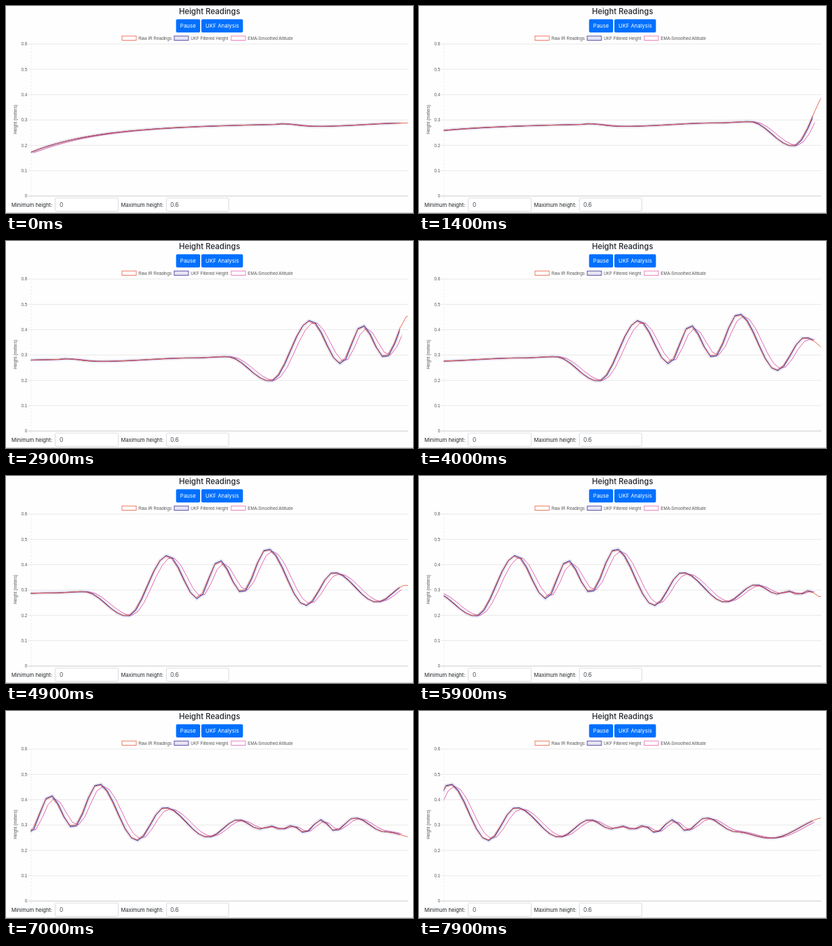
These frames come from a looping animation (600 by 305 pixels, 8000 ms). An HTML page:

```html
<!DOCTYPE html>
<html lang="en">
<head>
<meta charset="utf-8">
<title>Height Readings</title>
<style>
  html, body { margin: 0; width: 100%; height: 100%; overflow: hidden; background: #fefefe; }
  svg { display: block; width: 600px; height: 305px; }
  text { font: 7.7px Inter, "Open Sans", sans-serif; fill: #212529; }
  .chart text { font: 6.3px "Liberation Sans", Arial, sans-serif; fill: #585858; }
  .title { font-size: 11.5px; font-weight: 500; }
  .button { fill: #0070ff; }
  .caption { font-size: 7.9px; fill: #fff; }
  .field { fill: #fff; stroke: #d9dce0; }
  .value { font-size: 8.4px; fill: #495057; }
  polyline { fill: none; stroke-linejoin: round; }
</style>
</head>
<body>
<svg viewBox="0 0 600 305">
  <defs>
    <clipPath id="rawArea"><rect x="36.5" y="50" width="556" height="235"/></clipPath>
    <clipPath id="ukfArea"><rect x="36.5" y="50" width="544" height="235"/></clipPath>
    <clipPath id="emaArea"><rect x="36.5" y="50" width="547" height="235"/></clipPath>
  </defs>
  <text class="title" x="300" y="12.3" text-anchor="middle">Height Readings</text>
  <rect class="button" x="250.7" y="19.5" width="35.5" height="19.5" rx="2"/>
  <rect class="button" x="288" y="19.5" width="61.3" height="19.5" rx="2"/>
  <text class="caption" x="268.3" y="32" text-anchor="middle">Pause</text>
  <text class="caption" x="318.7" y="32" text-anchor="middle">UKF Analysis</text>

  <g class="chart">
    <g id="legend"></g>
    <g id="grid"></g>
    <path d="M37 56V285" stroke="#f4ecec" stroke-dasharray="3 2"/>
    <text transform="translate(15.7 167) rotate(-90)" text-anchor="middle">Height (meters)</text>
    <g clip-path="url(#emaArea)"><polyline id="ema" stroke="#e0559f" stroke-width=".9"/></g>
    <g clip-path="url(#ukfArea)">
      <polyline id="band" stroke="#3a2f96" stroke-opacity=".1" stroke-width="5.5"/>
      <polyline id="ukf" stroke="#453c9c" stroke-width="1.1"/>
    </g>
    <g clip-path="url(#rawArea)"><polyline id="raw" stroke="#e4583f" stroke-width=".9"/></g>
  </g>

  <text x="8" y="295.5">Minimum height:</text>
  <rect class="field" x="72.5" y="283" width="93" height="19.5" rx="2"/>
  <text class="value" x="79" y="296">0</text>
  <text x="169.5" y="295.5">Maximum height:</text>
  <rect class="field" x="236.5" y="283" width="92" height="19.5" rx="2"/>
  <text class="value" x="242.3" y="296">0.6</text>
  <path d="M0 304.5H600" stroke="#d2d2d2"/>
</svg>
<script>
const $ = id => document.getElementById(id);
const STEP = 9, START = 37, END = 1468;

// Turning points of the height curve; the curve swings between them.
const turns = [
  [402, 173.3], [455, 177.4], [597, 172.3], [645, 170.3], [709, 206.5], [768, 117],
  [813, 181], [844, 124], [878, 172], [915, 107], [972, 191], [1013, 142], [1077, 186],
  [1122, 160], [1153, 174], [1171, 169.5], [1184, 175], [1201, 168.5], [1219, 179.5],
  [1244, 160], [1264, 177], [1293, 157], [1337, 178], [1388, 187.5], [1475, 156]
];
const scroll = [[0, 0], [1400, 157], [2900, 319], [4000, 444], [5900, 625], [7000, 779], [7900, 870]];

const linear = u => u;
const swing = u => (1 - Math.cos(Math.PI * u)) / 2;

function between(points, x, ease) {
  const i = points.findIndex(p => p[0] >= x);
  if (i < 1) return points[i ? points.length - 1 : 0][1];
  const [x0, y0] = points[i - 1], [x1, y1] = points[i];
  return y0 + (y1 - y0) * ease((x - x0) / (x1 - x0));
}

// The climb settles exponentially before the swings begin.
const settle = x => 178 - 0.011 * x + 38 * Math.exp((START - x) / 95);
const height = x => x < turns[0][0] ? settle(x) : between(turns, x, swing);

const ukf = [], raw = [], ema = [];
let smooth = height(START) + 2;
for (let x = START; x <= END; x += STEP) {
  const y = height(x);
  smooth += 0.7 * (y - smooth);
  ukf.push([x, y]);
  raw.push([x - 1, 0.8 * y + 0.1 * (height(x - STEP) + height(x + STEP))]);
  ema.push([x + 3, smooth]);
}

const lines = { raw, ukf, band: ukf, ema };
for (const id in lines) $(id).setAttribute("points", lines[id].join(" "));

for (let i = 0; i <= 6; i++) {
  const y = 280 - i * 37.33;
  $("grid").innerHTML +=
    `<path d="M32 ${y}H593" stroke="${i ? "#e8e8e8" : "#cacaca"}"/>
     <text x="31.2" y="${y + 2.2}" text-anchor="end">${i ? "0." + i : 0}</text>`;
}

[[171, "Raw IR Readings", "#ee7a62", "#fff"],
 [248, "UKF Filtered Height", "#5a51a8", "#e6e4f3"],
 [332, "EMA-Smoothed Altitude", "#ee7fbd", "#fff"]].forEach(([x, name, color, fill]) => {
  $("legend").innerHTML +=
    `<rect x="${x}" y="44.2" width="21" height="6.3" fill="${fill}" stroke="${color}"/>
     <text x="${x + 24.2}" y="49.6">${name}</text>`;
});

function draw(now) {
  const time = Math.floor(now % 8000 / 100) * 100;
  const shift = `translate(${-between(scroll, time, linear)} 0)`;
  for (const id in lines) $(id).setAttribute("transform", shift);
  requestAnimationFrame(draw);
}
draw(0);
</script>
</body>
</html>
```
